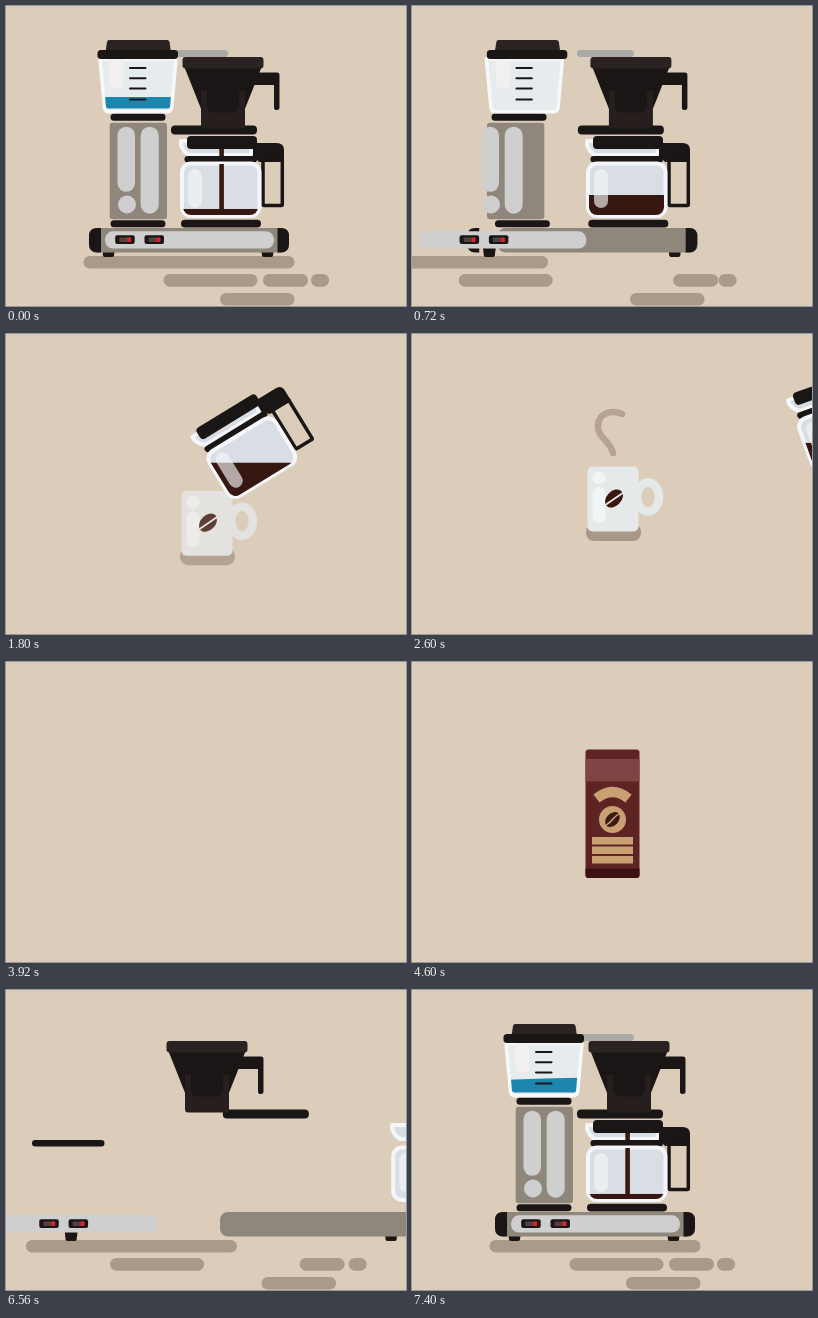
An HTML page that plays this animation: 400x300 px, repeating every 7440 ms.

```html
<!DOCTYPE html>
<html lang="en">
<head>
<meta charset="utf-8">
<title>Coffee</title>
<style>
html, body { margin: 0; width: 100%; height: 100%; overflow: hidden; background: #dccdba; }
svg { display: block; width: 100vw; height: 100vh; }
</style>
</head>
<body>
<svg id="stage" viewBox="0 0 400 300" xmlns="http://www.w3.org/2000/svg">
  <defs>
    <clipPath id="tankClip"><path d="M96 53H168L164 101Q163.500 102.500 161.500 102.500H103Q101 102.500 100 101Z"/></clipPath>
    <clipPath id="glassClip"><rect x="177" y="158" width="75" height="51" rx="8"/></clipPath>
    <ellipse id="bean" rx="10.500" ry="7.300" transform="rotate(-46)"/>
  </defs>
  <rect width="400" height="300" fill="#dccdba"/>
  <g id="machine"></g>
  <g id="cup">
    <rect x="174" y="190" width="55" height="17" rx="8" fill="#a99788"/>
    <ellipse cx="236" cy="163" rx="11" ry="14.500" fill="none" stroke="#e5e9ea" stroke-width="8.500"/>
    <rect x="175.500" y="132.500" width="51" height="65" rx="5" fill="#e5e9ea"/>
    <circle cx="187" cy="144" r="6.500" fill="#f2f5f6"/>
    <rect x="180.500" y="153" width="13" height="36" rx="6.500" fill="#f2f5f6"/>
    <g transform="translate(202 164.500)" fill="#3b1710">
      <use href="#bean"/><path d="M-11 8L11-7" stroke="#e5e9ea" stroke-width="1.800"/>
    </g>
  </g>
  <path id="steam" d="M201 119C198 106 185 104 186 91C187 78 201 76 210 80" pathLength="100" fill="none" stroke="#b7a294" stroke-width="6.500" stroke-linecap="round" stroke-dasharray="100 120"/>
  <g id="pot"></g>
  <g id="front"></g>
  <circle id="grounds" cx="222.500" r="6.500" fill="#a07a56"/>
  <g id="filter">
    <path d="M158 119Q200 94 243 119Q251 124 246 130L216 170Q214 173.500 210 173.500H191Q187 173.500 185 170L155 130Q150 124 158 119Z" fill="#c9a072"/>
    <path d="M187 165L188.500 164M190 170L195 164M197 170L202 164M204 170L209 164M211 170L215 164" stroke="#9f7952" stroke-width="3.200" stroke-linecap="round"/>
  </g>
  <g id="bag"></g>
</svg>
<script>
const LOOP = 7440;
const SLIDE = 400;
const STAY = Infinity;
const BLACK = '#1a1615', SOFT_BLACK = '#2a2321', SHADE = '#a99a89', METAL = '#8f877c';
const LIGHT = '#cfcfcf', TAN = '#c9a072', BREW = '#371711';
const el = id => document.getElementById(id);
const clamp = v => Math.max(0, Math.min(1, v));
const span = (t, a, b) => clamp((t - a) / (b - a));
const mix = (a, b, p) => a + (b - a) * p;
const easeOut = p => 1 - (1 - p) ** 3;
const easeInOut = p => p < .5 ? 4 * p ** 3 : 1 - 4 * (1 - p) ** 3;
const move = (node, x, y = 0) => node.setAttribute('transform', `translate(${x} ${y})`);
const show = (node, on) => node.setAttribute('display', on ? 'inline' : 'none');
const box = (x, y, w, h, r, fill) =>
  `<rect x="${x}" y="${y}" width="${w}" height="${h}" rx="${r}" fill="${fill}"/>`;
const path = (d, fill, extra = '') => `<path d="${d}" fill="${fill}" ${extra}/>`;

function add(parent, markup) {
  const g = document.createElementNS('http://www.w3.org/2000/svg', 'g');
  g.innerHTML = markup;
  parent.appendChild(g);
  return g;
}

const parts = [];
// dx: distance off stage; start, leave: when the slide in and out begin
function part(parent, dx, start, leave, markup) {
  parts.push({ node: add(el(parent), markup), dx, start, leave });
}

const rocker = x => box(x, 229.200, 19.500, 8.800, 2, BLACK) +
  box(x + 4, 231.500, 11.500, 4.500, 1, '#54403d') + box(x + 12, 231.500, 4, 4.500, 1, '#e0202c');
const foot = x => path(`M${x} 241h13l-1 8.500q-.5 1.500-2 1.500h-7q-1.500 0-2-1.500z`, BLACK);

part('machine', -295, 6393, 400, box(77.500, 250, 211, 12.500, 6.200, SHADE));
part('machine', -260, 6397, 420, box(157.500, 268, 94, 12.700, 6.300, SHADE));
part('machine', 150, 6411, 600, box(257, 268, 45, 12.700, 6.300, SHADE));
part('machine', 100, 6450, 620, box(305, 268, 18, 12.700, 6.300, SHADE));
part('machine', 190, 6402, 610, box(214, 287, 74.500, 12.500, 6.200, SHADE));
part('machine', 235, 6700, 728, box(165, 44, 57, 7, 3.500, '#a9a9a7'));
part('machine', -115, 6436, 480, foot(96));
part('machine', 150, 6536, 640, foot(255));
part('machine', 330, 6455, 640, box(83, 222, 200, 24.500, 8, METAL));
part('machine', -100, 6570, 460, path('M95 222V246.500H91Q83 246.500 83 238V230Q83 222 91 222Z', BLACK));
part('machine', 135, 6580, 620, path('M271.500 222V246.500H275Q283 246.500 283 238V230Q283 222 275 222Z', BLACK));
part('machine', -270, 6463, 440, box(99, 225.300, 169, 17.200, 8, LIGHT));
part('machine', -160, 6473, 430, rocker(109.200) + rocker(138.500));
part('machine', -170, 6610, 520, box(104.500, 214.300, 55, 7, 3.500, BLACK));
part('machine', 230, 6600, 650, box(175, 213.800, 80, 7.800, 3.800, BLACK));
part('machine', -170, 6590, 500, box(103.700, 116.700, 57.300, 96.500, 3, METAL));
part('machine', -170, 6650, 470,
  box(111.500, 120.700, 17.500, 65, 8.700, LIGHT) + box(134.700, 120.700, 18, 87, 9, LIGHT) +
  `<circle cx="121" cy="198.500" r="9" fill="${LIGHT}"/>`);
part('machine', -170, 6640, 510, box(104.500, 107.500, 55, 7.200, 3.500, BLACK));
part('machine', -180, 6660, 530,
  path('M94 53H170L165.700 101.500Q165 105.800 161 105.800H103.500Q99 105.800 98.500 101.500Z', '#e6ebed', 'stroke="#f6f8f9" stroke-width="3.500"') +
  `<path id="water" fill="#1c86af" clip-path="url(#tankClip)"/>` +
  path('M103 53H117.500V76Q117 83 110.500 83Q104 83 103.500 76Z', '#f3f1ee', 'fill-opacity=".85"') +
  path('M124 62H139.500M124 72.200H139.500M124 82.500H139.500M124 93.500H139.500', 'none', `stroke="${BLACK}" stroke-width="2" stroke-linecap="round"`));
part('machine', -180, 6710, 540,
  path('M103 34H161Q163 34 163.500 36L165 46H99.500L101 36Q101.500 34 103 34Z', SOFT_BLACK) + box(91.500, 44, 80.500, 9, 3.500, BLACK));

part('pot', 235, 6547, STAY,
  path('M175 135H245.500Q247.500 143 244 149H184Q178 147.500 175 139Z', '#d8dde3', 'stroke="#f4f6f9" stroke-width="4" stroke-linejoin="round"') +
  box(213.300, 134, 4.600, 18, 0, '#3a1913').replace('<rect', '<rect id="drip"'));
part('pot', 160, 6600, STAY,
  path('M247 137H270.500Q278 137 278 144V156H253L247 150Z', BLACK) +
  `<rect x="257" y="152" width="19.300" height="47.500" rx="1" fill="none" stroke="${BLACK}" stroke-width="3.500"/>`);
part('pot', -255, 6498, STAY, box(178.500, 150, 72.500, 6.500, 3.200, BLACK));
part('pot', 235, 6547, STAY,
  `<rect x="176" y="157.500" width="77.500" height="52.500" rx="9" fill="#d9dee4" stroke="#f4f6f9" stroke-width="4"/>
   <g clip-path="url(#glassClip)"><rect id="pourIn" x="213.300" y="157" width="4.600" height="54" fill="#3a1913"/>
   <rect id="coffee" x="125" width="180" height="120" fill="${BREW}"/></g>` +
  box(182, 163, 14, 39, 7, '#f4f6f6" fill-opacity=".65'));
part('pot', 235, 6600, STAY, box(181, 130, 70, 13, 4, BLACK));
const stream = add(el('machine'), `<rect x="202.500" y="88" width="5" height="70" rx="2" fill="${BREW}"/>`);

part('front', 240, 6401, 660, box(165, 119.500, 86, 9, 4, BLACK));
const holder = add(el('front'),
  path('M178 60H256L238.500 104H195.500Z', BLACK) +
  path('M195 85H239V119Q239 122.500 236 122.500H198Q195 122.500 195 119Z', '#261f1d') +
  path('M201 80H233V99Q233 106.500 226 106.500H208Q201 106.500 201 99Z', BLACK) +
  box(176.500, 51, 81, 11.500, 3, SOFT_BLACK) +
  path('M247 66.500H271Q273.500 66.500 273.500 69V102Q273.500 104 271 104Q268 104 268 102V79H245Z', BLACK));

const bag = el('bag');
const bagPieces = [
  [-240, 3920, box(173.500, 87.500, 54, 128.500, 3, '#5e2423') + path('M173.500 206.500H227.500V213Q227.500 216 224.500 216H176.500Q173.500 216 173.500 213Z', '#3b1211')],
  [240, 4000, box(173.500, 97, 54, 22.500, 0, '#7f4443')],
  [-240, 4070, path('M184.500 136.500Q200.500 123.500 216.500 136.500', 'none', `stroke="${TAN}" stroke-width="10"`)],
  [240, 4130, `<circle cx="200.500" cy="157.500" r="13.500" fill="${TAN}"/><g transform="translate(200.500 157.500) scale(.82)" fill="#3b1a13"><use href="#bean"/><path d="M-8 7Q-2 3 0 0T8-7" fill="none" stroke="${TAN}" stroke-width="1.800"/></g>`],
  ...[175, 184.500, 194].map((y, i) => [i % 2 ? 240 : -240, 4180 + i * 40, box(180, y, 41, 7.500, 0, TAN)])
].map(([dx, start, markup]) => ({ dx, start, node: add(bag, markup) }));

function drawMachine(t, brew) {
  const entering = t > 6300;
  for (const p of parts) {
    const k = entering ? (1 - span(t, p.start, p.start + SLIDE)) ** 3
      : p.leave === STAY ? 0
      : t < 3100 ? span(t, p.leave, p.leave + SLIDE) ** 3 : 1;
    move(p.node, p.dx * k);
  }
  const y = Math.min(104, Math.max(76, 75 + 16 * (brew - 7160) / 280));
  const tilt = brew > 7160 ? Math.sin((7440 - brew) / 25) : 0;
  el('water').setAttribute('d', `M95 ${y + tilt}Q133 ${y - tilt / 2} 170 ${y - tilt}V106H95Z`);
  const dripping = brew >= 7160 && brew < 7960;
  show(el('drip'), dripping);
  show(el('pourIn'), dripping);
}

function drawPot(t, brew) {
  show(el('pot'), t < 2900 || t > 6300);
  let x = 226, y = 172, turn = 0;
  if (t < 3100) {
    const lift = easeInOut(span(t, 1560, 2000));
    const go = span(t, 2320, 2640) ** 2;
    x = mix(226, 263, lift) + 225 * go;
    y = mix(172, 70, lift) + 18 * go;
    turn = -50 * lift + 39 * go;
  }
  el('pot').setAttribute('transform', `translate(${x} ${y}) rotate(${turn}) translate(-226 -172)`);
  const top = t > 6300 || t < 1000
    ? 210 - 21 * span(brew, 7160, 8000)
    : 189 + 5 * span(t, 1960, 2320);
  el('coffee').setAttribute('y', top);
  el('coffee').setAttribute('transform', `rotate(${-turn} 215 184)`);
  const flow = span(t, 1980, 2060), cut = span(t, 2280, 2360);
  show(stream, flow > 0 && cut < 1);
  stream.firstChild.setAttribute('y', 88 + 60 * cut);
  stream.firstChild.setAttribute('height', Math.max(0, 70 * flow - 60 * cut));
}

function drawCup(t) {
  const on = t >= 1720 && t < 3560;
  const rise = span(t, 1720, 1980);
  show(el('cup'), on);
  move(el('cup'), 0, 74 * (1 - easeOut(rise)));
  el('cup').setAttribute('opacity', clamp(rise * 2.5));
  const grow = easeOut(span(t, 2340, 2600));
  show(el('steam'), on && grow > 0);
  el('steam').setAttribute('stroke-dashoffset', 100 * (1 - grow));
}

function drawBag(t) {
  show(bag, t >= 3920 && t < 5800);
  for (const p of bagPieces) move(p.node, p.dx * (1 - easeOut(span(t, p.start, p.start + 320))));
  const tip = easeInOut(span(t, 4680, 5080));
  const exit = span(t, 5421, 5771);
  const x = mix(200.5, 284.500, tip) + 185 * exit * exit;
  bag.setAttribute('transform', `translate(${x} ${mix(151.5, 113, tip)}) rotate(${-90 * tip}) translate(-200.5 -151.5)`);
}

function drawFilter(t) {
  const fall = span(t, 5760, 6000);
  show(el('filter'), t >= 4800 && t < 6000);
  move(el('filter'), 0, 195 * (1 - easeOut(span(t, 4800, 5120))) + 200 * fall * fall);
  const drop = ((t - 5120) % 130) / 130;
  show(el('grounds'), t >= 5120 && t < 5770);
  el('grounds').setAttribute('cy', 108 + 20 * drop * drop);
}

function drawHolder(t) {
  show(holder, t < 1100 || t >= 5760);
  if (t < 3100) move(holder, 230 * span(t, 640, 1040) ** 3);
  else move(holder, -16 * (1 - easeInOut(span(t, 6560, 6860))), -130 * (1 - easeOut(span(t, 5760, 6080))));
}

function draw(t) {
  const brew = t < 3100 ? t + LOOP : t;
  drawMachine(t, brew);
  drawPot(t, brew);
  drawCup(t);
  drawBag(t);
  drawFilter(t);
  drawHolder(t);
}

const began = performance.now();
function tick() {
  draw((performance.now() - began) % LOOP);
  requestAnimationFrame(tick);
}
tick();
</script>
</body>
</html>
```
